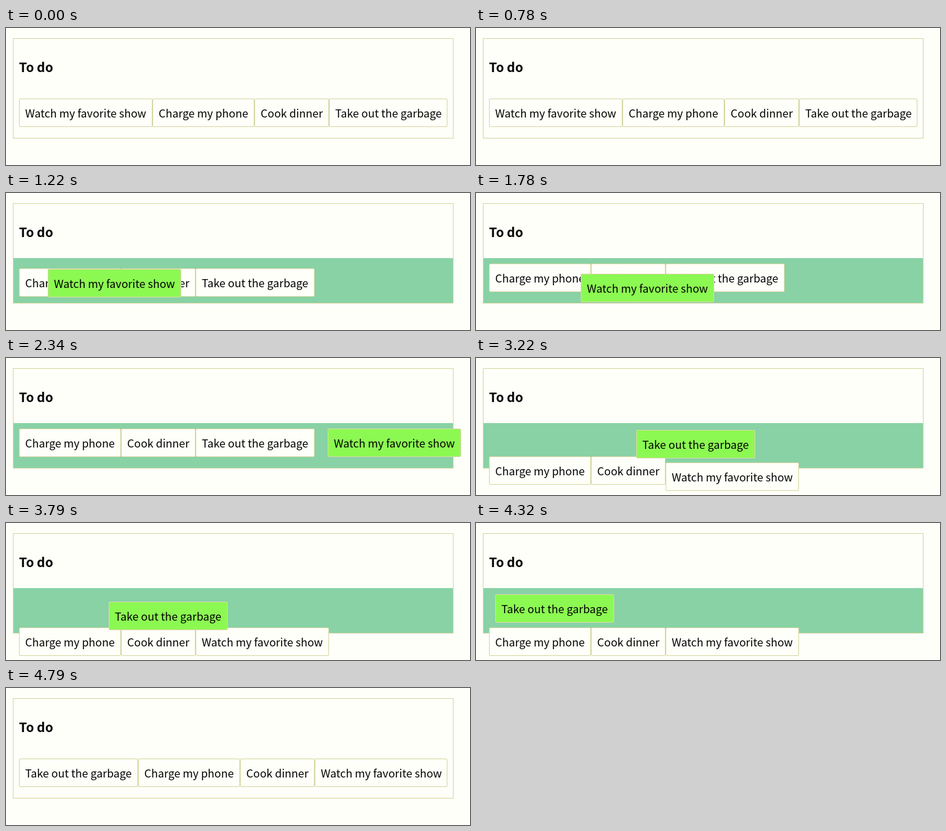
An HTML page for the animation above (6.23 s loop, 678 by 202 pixels).

```html
<!DOCTYPE html>
<html lang="en">
<head>
<meta charset="utf-8">
<title>To do</title>
<style>
  html, body { margin: 0; width: 100%; height: 100%; overflow: hidden; background: #fffffa; }
  svg { display: block; width: 678px; height: 202px; }
  text {
    font: 16px "Noto Sans CJK JP", "Noto Sans CJK SC", "Noto Sans CJK", "Noto Sans", sans-serif;
    fill: #000;
  }
  .title { font-size: 18.72px; font-weight: 700; }
  .frame { stroke: #d8d8a6; stroke-width: 1; }
</style>
</head>
<body>
<svg viewBox="0 0 678 202">
  <rect id="zone" x="11" y="96" width="642" height="66" fill="#88d2a5"/>
  <rect class="frame" x="10.5" y="15.5" width="643" height="147" fill="none"/>
  <text class="title" x="19" y="65">To do</text>
  <g id="list"></g>
</svg>
<script>
const LOOP = 6230;
const LEFT = 19.2, TOP = 104, SHIFT = 50;
const PAPER = "#fffffa", ACTIVE = "#8cf952";
const NS = "http://www.w3.org/2000/svg";
const zone = document.getElementById("zone");
const list = document.getElementById("list");

const make = (tag, attrs, parent) => {
  const el = document.createElementNS(NS, tag);
  for (const k in attrs) el.setAttribute(k, attrs[k]);
  return parent.appendChild(el);
};

const makeItem = (label, width) => {
  const group = make("g", {}, list);
  const box = make("rect", { class: "frame", x: 0.5, y: 0.5, height: 41, rx: 1.5 }, group);
  make("text", { x: 9, y: 28 }, group).textContent = label;
  return { group, box, width };
};

const watch = makeItem("Watch my favorite show", 194.6);
const charge = makeItem("Charge my phone", 148.9);
const cook = makeItem("Cook dinner", 108.9);
const take = makeItem("Take out the garbage", 173.7);

const clamp = v => Math.min(1, Math.max(0, v));
const mix = (a, b, p) => a + (b - a) * p;
const span = (t, from, to) => clamp((t - from) / (to - from));
const easeOut = (p, power) => 1 - Math.pow(1 - p, power);

const bezier = (x1, y1, x2, y2) => p => {
  const at = (a, b, u) => 3 * (1 - u) * (1 - u) * u * a + 3 * (1 - u) * u * u * b + u * u * u;
  let lo = 0, hi = 1;
  for (let i = 0; i < 24; i++) {
    const mid = (lo + hi) / 2;
    if (at(x1, x2, mid) < p) lo = mid; else hi = mid;
  }
  return at(y1, y2, (lo + hi) / 2);
};
const slide = bezier(0.2, 0, 0, 1);
const settle = bezier(0.2, 1, 0.1, 1);

function place(item, x, y, width, active) {
  item.group.setAttribute("transform", `translate(${Math.round(x)} ${Math.round(y)})`);
  item.box.setAttribute("width", width - 1);
  item.box.setAttribute("fill", active ? ACTIVE : PAPER);
}

// Lays items out in a row; drop(item) gives each one's downward offset.
function row(items, drop = () => 0) {
  let x = LEFT;
  for (const item of items) {
    const width = Math.round(x + item.width) - Math.round(x);
    place(item, x, TOP + drop(item), width, false);
    x += item.width;
  }
}

function drag(item, x, y) {
  place(item, x, y, Math.round(item.width), true);
  if (list.lastChild !== item.group) list.appendChild(item.group);
}

function firstDrag(t) {
  const back = SHIFT * (1 - slide(span(t, 1127, 1327)));
  row([charge, cook, take], () => back);
  const p = span(t, 1120, 1630);
  const q = settle(span(t, 2112, 2490));
  const x = mix(19, 153, easeOut(p, 1.72));
  const y = mix(TOP, 119, easeOut(p, 3.5));
  if (t < 2140) drag(watch, x, y);
  else drag(watch, mix(x, 471.6, q), mix(y, TOP, q));
}

function secondDrag(t) {
  const down = SHIFT * slide(span(t, 3136, 3336));
  row([charge, cook, watch], item => item === watch ? SHIFT : down);
  const p = span(t, 3120, 3730);
  const pull = span(t, 4000, 4240);
  const q = settle(span(t, 4240, 4580));
  let x = mix(277, 150, easeOut(p, 2.3));
  let y = mix(TOP, 116, p);
  if (t >= 4020) {
    x = mix(mix(x, 90, pull), 19, q);
    y = mix(mix(y, 113, pull), TOP, q);
  }
  drag(take, x, y);
}

function render(t) {
  const first = t >= 1120 && t < 2510;
  const second = t >= 3120 && t < 4590;
  zone.style.display = first || second ? "" : "none";
  if (first) firstDrag(t);
  else if (second) secondDrag(t);
  else if (t < 1120) row([watch, charge, cook, take]);
  else if (t < 3120) row([charge, cook, take, watch]);
  else row([take, charge, cook, watch]);
}

const start = performance.now();
function tick() {
  render((performance.now() - start) % LOOP);
  requestAnimationFrame(tick);
}
tick();
</script>
</body>
</html>
```
